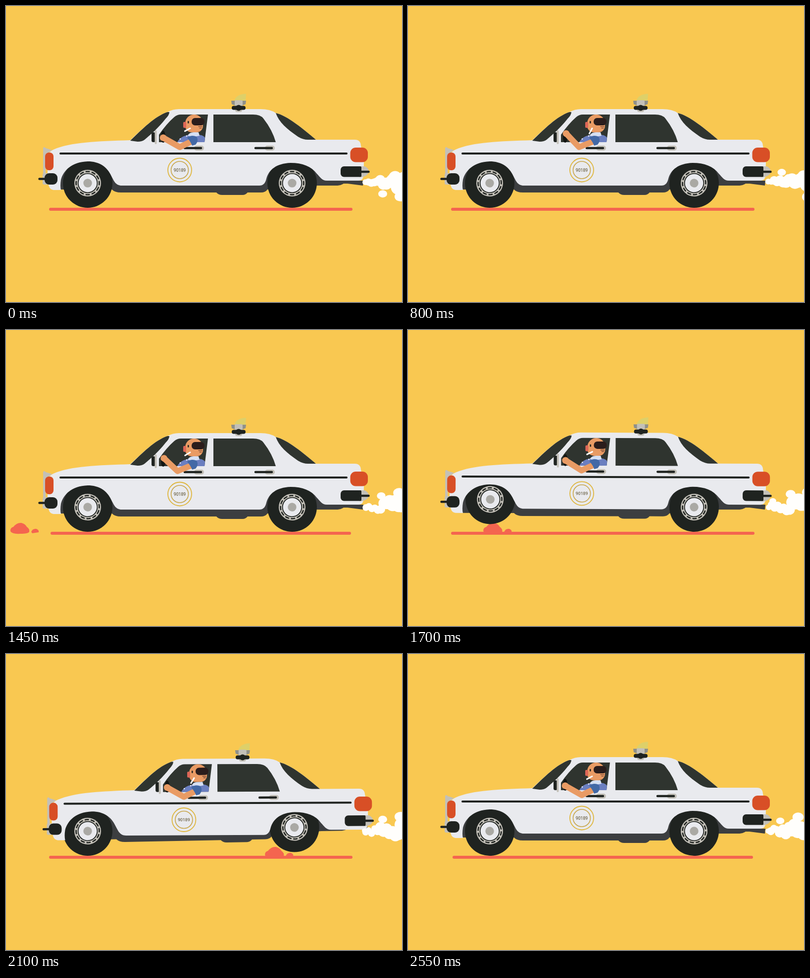
Animation, 800 px wide and 600 px high, one loop 2.6 s. Source, as an HTML page with a canvas:

```html
<!DOCTYPE html>
<html lang="en">
<head>
<meta charset="utf-8">
<title>Taxi ride</title>
<style>
html, body { margin: 0; height: 100%; overflow: hidden; background: #f9c851; }
canvas { display: block; }
</style>
</head>
<body>
<canvas id="stage" width="800" height="600"></canvas>
<script>
const ctx = document.getElementById('stage').getContext('2d');
const LOOP = 2600, STEP = 50, TAU = Math.PI * 2;
const BODY = '#e9eaee', DARK = '#1f2320', GLASS = '#2f342f', UNDER = '#3c3e40',
  GREY = '#c3c0b8', RED = '#f4654f', LAMP = '#d84f26', SKIN = '#e99b64';

// Smooth rise from 0 to 1 at the peak, then back to 0
function bump(t, start, peak, end) {
  const u = Math.max(0, t < peak ? (t - start) / (peak - start) : (end - t) / (end - peak));
  return u * u * (3 - 2 * u);
}

const noise = n => {
  const v = Math.sin(n * 127.1 + 11.7) * 43758.5453;
  return v - Math.floor(v);
};

function shape(d, color) {
  ctx.fillStyle = color;
  ctx.fill(new Path2D(d));
}

function line(d, color, width) {
  ctx.strokeStyle = color;
  ctx.lineWidth = width;
  ctx.lineCap = ctx.lineJoin = 'round';
  ctx.stroke(new Path2D(d));
}

function box(x, y, w, h, r, color) {
  ctx.fillStyle = color;
  ctx.beginPath();
  ctx.roundRect(x, y, w, h, r);
  ctx.fill();
}

function oval(x, y, rx, color, ry = rx) {
  ctx.fillStyle = color;
  ctx.beginPath();
  ctx.ellipse(x, y, rx, ry, 0, 0, TAU);
  ctx.fill();
}

function ring(x, y, r, color, width) {
  ctx.strokeStyle = color;
  ctx.lineWidth = width;
  ctx.beginPath();
  ctx.arc(x, y, r, 0, TAU);
  ctx.stroke();
}

function placed(x, y, degrees, draw) {
  ctx.save();
  ctx.translate(x, y);
  ctx.rotate(degrees * TAU / 360);
  draw();
  ctx.restore();
}

function drawGround(t) {
  const inset = t / STEP % 2 * 3;
  const lift = bump(t, 1700, 1900, 2050);
  line(`M${90 + inset + 31 * lift} ${412 + 1.5 * lift}L${697 - inset} 412`, RED, 6);
}

function drawRock(t) {
  const s = t - 1450;
  if (s < -200) return;
  placed(9 + 0.437 * s + 0.000545 * s * s, 0, 0, () => {
    shape('M0 408Q-1 401 6 399Q13 390 22 391Q30 393 33 399Q39 403 38 409Q36 413 20 413Q3 414 0 408Z', RED);
    shape('M42 409Q45 402 52 403Q58 405 57 410L44 412Z', RED);
  });
}

function drawWheel(x, y, t) {
  placed(x, y, -6 * 360 * t / LOOP, () => {
    oval(0, 0, 50, DARK);
    oval(0, 0, 27, GREY);
    for (let i = 0; i < 12; i++) {
      ctx.rotate(TAU / 12);
      line('M-3.2 -23.2Q0 -23.8 3.2 -23.2', DARK, 2.6);
    }
    oval(0, 0, 20.3, DARK);
    oval(0, 0, 18.5, BODY);
    oval(0, 0, 8.7, '#aaa9a4');
  });
}

function drawWheels(t) {
  drawWheel(165 + 12 * bump(t, 1650, 1900, 2050), 359 - 16 * bump(t, 1600, 1710, 1880), t);
  drawWheel(578 + 6 * bump(t, 2030, 2130, 2350), 359 - 12 * bump(t, 2030, 2150, 2350), t);
}

function drawUnderside() {
  shape('M108 372C104 330 125 304 165 304C202 304 218 340 223 350L520 350C526 325 548 312 578 312C612 312 633 335 641 345L690 345L690 353Q680 364 670 364L628 364L528 372Q524 378 515 378L488 378Q484 383 478 383L437 383Q429 383 425 378L232 378Q220 378 214 372Z', UNDER);
  shape('M676 354L722 354L721 364L690 360L676 360Z', UNDER);
}

function drawShell() {
  const screen = 'C276 249 300 224 326 215', rear = 'C568 222 600 249 626 271';
  shape(`M88 368Q84 361 84 340L84 305Q86 295 96 291C130 276 185 274 251 272${screen}Q337 209 349 209L514 209Q534 209 545 217${rear}L705 271Q716 271 717 283L723 318L722 346Q720 354 712 354L648 354C638 354 634 346 628 340C617 325 599 318 575 318C546 319 531 332 526 350Q523 364 512 364L234 364C221 364 218 354 213 345C204 325 188 315 165 315C132 316 116 334 111 352Q109 365 111 373L96 373Q90 372 88 368Z`, BODY);
  shape(`M251 273${screen}L330 215Q330 221 322 229C309 246 292 261 280 271Q275 275 266 275Z`, GLASS);
  shape(`M545 217${rear}L610 271Q600 271 590 265C568 250 551 235 545 217Z`, GLASS);
  shape('M309 276L309 261Q324 239 340 225Q346 220 353 220L408 220L401 276Z', GLASS);
  shape('M419 220L499 220Q514 220 520 228Q538 251 545 276L419 276Z', GLASS);
  line('M110 299L688 299', DARK, 4);
  for (const x of [380, 523]) {
    box(x, 283, 20, 10, 5, GREY);
    line(`M${x - 19} 288h33`, DARK, 4.5);
  }
}

function drawFittings() {
  shape('M75 288Q77 284 80 288L93 292Q82 298 80 308L80 340L75 340Z', GREY);
  box(79, 297, 17, 36, 8, LAMP);
  box(74, 339, 12, 23, 3, GREY);
  box(78, 339, 26, 23, 9, DARK);
  line('M67.5 350.5h15', DARK, 4.5);

  box(695.5, 287, 35.5, 29.5, 11, LAMP);
  shape('M714 325L725 325Q733 329 733 336Q731 344 720 347L714 347Z', GREY);
  box(676, 325, 42, 21.5, [7, 2, 2, 7], DARK);
  line('M716 336h16.5', DARK, 4.5);

  ring(351, 332.5, 24, '#dfb73f', 1.8);
  ring(351, 332.5, 17.5, '#c7a549', 1.6);
  ctx.fillStyle = '#514522';
  ctx.font = '8.7px Roboto, sans-serif';
  ctx.textAlign = 'center';
  ctx.fillText('90189', 351, 335.5);
}

function drawBeacon() {
  shape('M461 193C463 183 473 178 485 178L484 193Z', '#ded069');
  box(463, 206, 14, 9, 4, GREY);
  shape('M455 192L485 192L484 199L476 202L464 202L456 199Z', '#8f9089');
  box(462, 191, 16, 13, 2, GREY);
  box(456, 202.5, 28, 8, 4, DARK);
  oval(470, 206.5, 6, DARK);
}

function drawDriver(t) {
  oval(317.5, 265, 4.5, '#121513', 12);
  shape('M346 276Q350 268 359 264L372 260L390 261Q399 262 402 267L401 276Z', '#6b7fc0');
  box(362, 220, 36, 36, [18, 18, 13, 13], SKIN);
  shape('M367 263Q370 256 379 256L389 256L391 263Q378 266 367 263Z', '#d5dff3');
  box(358, 235, 6, 12, 2, '#dd6657');
  box(375, 227, 26, 15, 7, '#2b1d1c');
  line('M389 244.5h7M391 247.5h4', '#5c3428', 1.2);
  box(367, 233, 2.5, 5, 1, DARK);

  const tilt = -28 - 34 * bump(t, 0, 800, 1600) + 14 * bump(t, 1650, 1900, 2000) - 30 * bump(t, 1950, 2100, 2400);
  placed(372, 248, tilt, () => line('M0 0h-12', '#fff', 3));
  oval(352, 269.5, 1.3, '#fff');
  oval(365, 263.5, 1.3, '#fff');

  const steer = Math.min(1, 1.5 * bump(t, 150, 1100, 1850));
  const handX = 317.5 + 2 * steer, handY = 267 - 8.5 * steer;
  line(`M${handX} ${handY}L${351 - 5.5 * steer} 286L376 274`, SKIN, 12);
  oval(handX, handY, 6.8, SKIN);
  shape('M366 267Q375 260 385 265Q390 273 383 281L376 283Q373 275 366 267Z', '#4369a6');

  box(294, 256, 8, 20, 3.5, DARK);
  box(300.5, 252, 4, 28, 2, GREY);
}

// Tilts a part of the car around its rear axle side
function tilted(t, turn, dy, draw) {
  placed(672 + 8.5 * bump(t, 1900, 2100, 2400), 355 + dy, turn, () => {
    ctx.translate(-672, -355);
    draw();
  });
}

function drawCar(t) {
  const frontHop = bump(t, 1650, 1900, 2090);
  const axleHop = bump(t, 1950, 2120, 2400);
  tilted(t, 1.25 * frontHop - 1.2 * axleHop, -6 * axleHop, drawUnderside);
  drawWheels(t);
  const turn = 2.05 * frontHop - 0.9 * bump(t, 2040, 2220, 2400);
  const dy = 2.2 * bump(t, 1900, 2100, 2200) - 8 * bump(t, 2100, 2220, 2400);
  tilted(t, turn, dy, () => {
    drawShell();
    drawFittings();
    drawBeacon();
    drawDriver(t);
  });
}

function drawSmoke(t) {
  const white = '#fffefc';
  for (let i = -15; i * 110 <= t; i++) {
    const u = (t - i * 110) / 1500;
    const sway = noise(i + 40) - 0.5;
    oval(726 + 82 * u, 359 - 4 * u + sway * (8 + 20 * u), 4 + 8 * Math.min(1, u * 1.4) + 3 * noise(i + 90), white);
  }
  // Loose puffs sink at first, later ones rise
  for (let i = -2; i < 4; i++) {
    const rises = i >= 0;
    const age = t - 600 * i - (rises ? 300 : 0);
    if (age < 0) continue;
    const drift = 30 * (1 - Math.exp(-age / 420));
    oval(725 + 0.06 * age, 358 + (rises ? -drift : drift), 6 + age * 0.005, white, 5 + age * 0.004);
  }
}

function frame(time) {
  const t = Math.floor(time % LOOP / STEP) * STEP;
  ctx.fillStyle = '#f9c851';
  ctx.fillRect(0, 0, 800, 600);
  drawGround(t);
  drawRock(t);
  drawCar(t);
  drawSmoke(t);
}

const start = performance.now();
function tick() {
  frame(performance.now() - start);
  requestAnimationFrame(tick);
}
tick();
</script>
</body>
</html>
```
